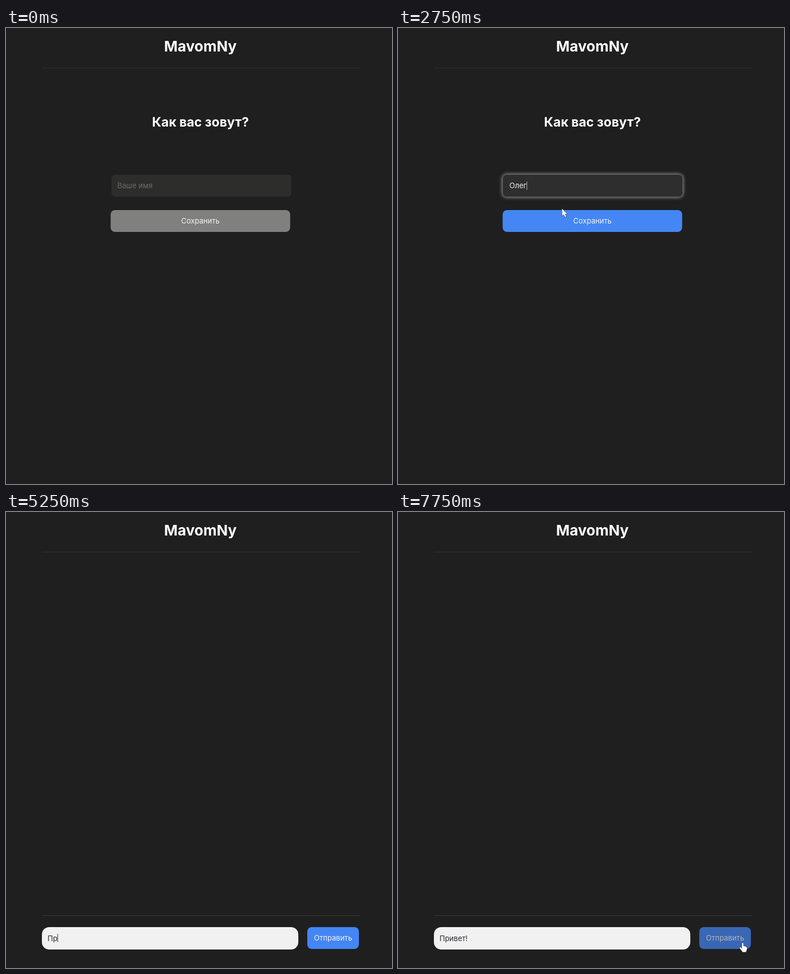
Recreate the animation shown at these times as an HTML page. Size 688x814 px, loop 8 s.

```html
<!DOCTYPE html>
<html lang="ru">
<head>
<meta charset="utf-8">
<title>Чат</title>
<style>
  html, body { margin: 0; width: 100%; height: 100%; overflow: hidden; background: #1f1f1f; }
  svg { display: block; width: 688px; height: 814px; }
  text { font: 13px Inter, "Open Sans", sans-serif; font-optical-sizing: none; fill: #f4f4f4; white-space: pre; }
  .mid { text-anchor: middle; }
  .brand { font-size: 26px; font-weight: 700; fill: #fff; }
  .title { font-size: 23px; font-weight: 700; fill: #fff; }
  .glow { filter: drop-shadow(0 0 3px rgba(255, 255, 255, .6)); }
</style>
</head>
<body>
<svg id="stage" viewBox="0 0 688 814"></svg>
<script>
const LOOP = 8000, STEP = 250;
const BLUE = '#4486f4', GREY = '#80807f';
const stage = document.getElementById('stage');

const rect = (x, y, w, h, r, fill, extra = '') =>
  `<rect x="${x}" y="${y}" width="${w}" height="${h}" rx="${r}" fill="${fill}" ${extra}/>`;
const label = (x, y, str, cls = '', fill = '') =>
  `<text x="${x}" y="${y}" class="${cls}" ${fill && `style="fill:${fill}"`}>${str}</text>`;
const rule = (y, color) => rect(65, y, 566, 1, 0, color);

const button = (x, y, w, str, active, hover) =>
  `<g opacity="${hover ? .7 : 1}">${rect(x, y, w, 39, 8, active ? BLUE : GREY)}
   ${label(x + w / 2, y + 23.8, str, 'mid')}</g>`;

// Part of a word typed so far, given the moment each letter lands
const typed = (word, times, t) => word.slice(0, times.filter(k => k <= t).length);

const cursors = {
  arrow: 'M0 0V13L3 10.3L5 15L7.2 14L5.2 9.5H9Z',
  hand: 'M0 1.5Q0-.2 1.4 0Q2.6 0 2.6 1.5V6Q4.2 5 5 6.6Q6.4 5.9 7 7.3Q9 7 9 9V11Q9 13.5 7.5 15V16.5H.5V15.2' +
    'Q-1.5 13.4-3.6 10Q-4.5 8.6-3.4 8Q-2.3 7.5-1 9.2L0 10Z'
};
const cursor = (kind, x, y) =>
  `<path d="${cursors[kind]}" transform="translate(${x} ${y})" fill="#fff" stroke="#161616" stroke-width=".9" paint-order="stroke"/>`;

function field(x, y, value, hint, ink, hintInk) {
  return value ? label(x, y, value, 'value', ink) : label(x, y, hint, '', hintInk);
}

function nameScreen(t) {
  const name = typed('Олег', [750, 1250, 1500, 2250], t);
  const hover = t >= 3000;
  const box = name
    ? rect(186.5, 261.5, 321, 40, 7, '#2e2e2e', 'stroke="#606060" class="glow"')
    : rect(188, 262, 320.5, 39, 6, '#2d2d2c');
  let pointer = '';
  if (hover) pointer = cursor('hand', 296, t < 3250 ? 346 : 354);
  else if (t >= 2750) pointer = cursor('arrow', 292.5, 322.5);
  return label(346.5, 175.5, 'Как вас зовут?', 'mid title') + box +
    field(198.5, 285.8, name, 'Ваше имя', '#f0f0f0', '#6b6b6b') +
    button(186.5, 325, 320, 'Сохранить', name, hover) + pointer;
}

function chatScreen(t) {
  const message = typed('Привет!', [4750, 5250, 5500, 5750, 6000, 6250, 6500], t);
  const hover = t >= 7250;
  const k = Math.min(1, (t - 7250) / 500);
  return rule(720, '#3a3a3a') + rect(64, 741, 457, 40, 13, '#f1f1f1') +
    field(74, 765.8, message, 'Напишите что-нибудь...', '#242a33', '#777') +
    button(537, 741, 92, 'Отправить', message, hover) +
    (hover ? cursor('hand', 603 + 10 * k, 765 + 4 * k) : '');
}

function addCaret(chat) {
  const value = stage.querySelector('.value');
  if (!value && !chat) return;
  const x = (chat ? 74 : 198.5) + (value ? value.getComputedTextLength() : 0);
  stage.insertAdjacentHTML('beforeend', rect(x, chat ? 753 : 274, 1, 15, 0, chat ? '#333' : '#aaa'));
}

let shown = -1;
function frame(now) {
  const t = Math.floor(now % LOOP / STEP) * STEP;
  if (t !== shown) {
    shown = t;
    const chat = t >= 3750;
    stage.innerHTML = label(346.5, 41.5, 'MavomNy', 'mid brand') + rule(71, '#303030') +
      (chat ? chatScreen(t) : nameScreen(t));
    if (t < 7250) addCaret(chat);
  }
  requestAnimationFrame(frame);
}
frame(0);
</script>
</body>
</html>
```
